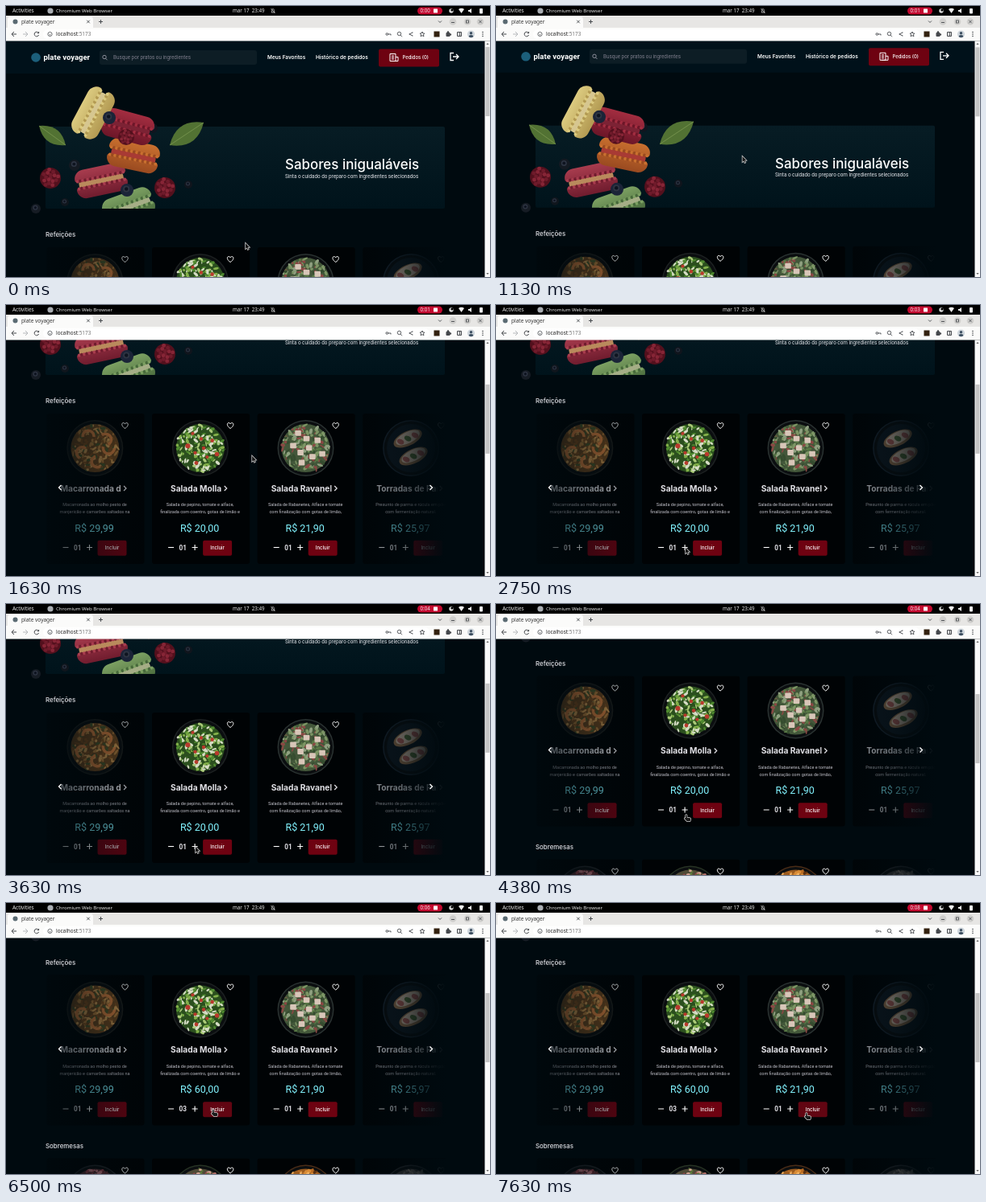
An HTML page with a canvas that plays this animation: 600 px wide and 337 px high, repeating every 8000 ms.

```html
<!DOCTYPE html>
<html lang="pt-BR">
<head>
<meta charset="utf-8">
<title>plate voyager</title>
<style>
  html, body { margin: 0; height: 100%; overflow: hidden; background: #000a0f; }
  canvas { display: block; width: 100vw; height: 100vh; }
</style>
</head>
<body>
<canvas id="stage" width="600" height="337"></canvas>
<script>
const ctx = document.getElementById('stage').getContext('2d');
const TAU = Math.PI * 2, LOOP = 8, STEP = 0.125;

// [seconds, x, y] of the pointer tip, and [seconds, offset] of the page scroll
const POINTER = [[0.125, 297, 295], [1, 305.5, 187], [1.9, 305, 188], [2.75, 235, 302], [3.9, 235, 302],
  [4.375, 235, 262], [5.5, 235, 262], [6.25, 254, 257], [6.45, 254, 257], [7.125, 383, 260],
  [7.3, 383, 260], [7.625, 384, 261]];
const SCROLL = [[1.1, 0], [1.6, 165], [3.9, 165], [4.3, 210.5]];

const DISHES = [
  { title: 'Macarronada de camarão', price: '29,99', plate: 'pasta',
    lines: ['Macarronada ao molho pesto de', 'manjericão e camarões saltados na'] },
  { title: 'Salada Molla', plate: 'salad',
    lines: ['Salada de pepino, tomate e alface,', 'finalizada com coentro, gotas de limão e'] },
  { title: 'Salada Ravanello', price: '21,90', plate: 'radish',
    lines: ['Salada de Rabanetes, Alface e tomate', 'com finalização com gotas de limão,'] },
  { title: 'Torradas de Parma', price: '25,97', plate: 'toast',
    lines: ['Presunto de parma e rúcula em pão', 'com fermentação natural.'] },
];
const DESSERTS = ['berries', 'peach', 'tart', 'cocoa'].map(plate => ({ plate }));

const PLATES = {
  pasta: { rim: '#1c1e1c', base: '#65431f', bits: ['#a8763a', '#794c20', '#c59350', '#46532a'], shrimp: '#c8773c' },
  salad: { rim: '#1d2122', base: '#2b4f1e', bits: ['#4f8a2f', '#83b04a', '#2a4f1c', '#a9c876', '#d5dcc4'],
    extra: ['#b83a2c', 9, 3.4] },
  radish: { rim: '#2a3231', base: '#43573a', bits: ['#587845', '#7c9564', '#354c2f', '#8a4844', '#8fa080'],
    extra: ['#d8c6b8', 9, 3.8, true] },
  toast: { rim: '#1b2733', base: '#101a23', bits: [], toast: true },
  berries: { rim: '#22262a', base: '#4b2b30', bits: ['#8c3d48', '#b8737a', '#5a2a30'] },
  peach: { rim: '#273324', base: '#4f4a36', bits: ['#b46f68', '#8e3e44', '#5b7a3a', '#d0a090'] },
  tart: { rim: '#4a2c16', base: '#9a5a1e', bits: ['#d88a34', '#b86a22', '#5a3010', '#eeb060'] },
  cocoa: { rim: '#2a2c30', base: '#3c3a3a', bits: ['#6a6462', '#4c4644', '#8a8078'] },
};

const ICONS = {
  heart: 'M0 3.5C-5 .3-4.2-3.4-2.2-3.4C-1-3.4 0-2.6 0-2C0-2.6 1-3.4 2.2-3.4C4.2-3.4 5 .3 0 3.5Z',
  left: 'M1.5-3L-1.5 0L1.5 3', right: 'M-1.5-3L1.5 0L-1.5 3', down: 'M-2-1L0 1L2-1',
  minus: 'M-3.5 0H3.5', plus: 'M-3.5 0H3.5M0-3.5V3.5', cross: 'M-1.8-1.8L1.8 1.8M-1.8 1.8L1.8-1.8',
  search: 'M1.7-.5A2.2 2.2 0 1 1-2.7-.5A2.2 2.2 0 1 1 1.7-.5M1 1.2L3 3.2',
  receipt: 'M-5-4.5H2V4.5H-5ZM2-.5H5V4.5H-3M-3-2H0M-3 0H0M-3 2H0',
  exit: 'M-1-4.5H-5V4.5H-1M-2 0H5M2-3L5 0L2 3',
  back: 'M3 0H-3M0-3L-3 0L0 3', forward: 'M-3 0H3M0-3L3 0L0 3',
  reload: 'M2.4-1.4A2.8 2.8 0 1 0 2.6 1M2.6-3V-1.2H.8',
  info: 'M2.6 0A2.6 2.6 0 1 1-2.6 0A2.6 2.6 0 1 1 2.6 0M0-.3V1.5',
  key: 'M-.4 0A1.3 1.3 0 1 1-3 0A1.3 1.3 0 1 1-.4 0H3V1.5',
  share: 'M2-2L-2 0L2 2M1.5-2H2.5M-2.5 0H-1.5M1.5 2H2.5',
  star: 'M0-3L.9-1L3-.8L1.4.6L2 2.8L0 1.7L-2 2.8L-1.4.6L-3-.8L-.9-1Z',
  bell: 'M-2 2H2L1.4 1V-.5C1.4-3-1.4-3-1.4-.5V1ZM-2.5-3L2.5 3',
  panel: 'M-2.5-2.5H2.5V2.5H-2.5ZM.6-2.5V2.5',
  arrow: 'M0 0V7L1.7 5.5L2.8 8L3.8 7.5L2.8 5.1L4.8 4.9Z',
  hand: 'M0 1C0-.3 1.6-.3 1.6 1V3.4L5.6 4.2C6.6 4.6 6.4 6 5.6 8H1.6L-1.2 5C-1.6 4.2-.8 3.7 0 4.4Z',
};

function text(str, x, y, size, { color = '#fff', weight = 400, face = 'Inter', align = 'left' } = {}) {
  ctx.font = `${weight} ${size}px ${face}, sans-serif`;
  ctx.fillStyle = color;
  ctx.textAlign = align;
  ctx.fillText(str, x, y);
}

function box(x, y, w, h, color, radius = 0) {
  ctx.fillStyle = color;
  ctx.beginPath();
  ctx.roundRect(x, y, w, h, radius);
  ctx.fill();
}

function oval(x, y, rx, ry, color, angle = 0) {
  ctx.fillStyle = color;
  ctx.beginPath();
  ctx.ellipse(x, y, rx, ry, angle, 0, TAU);
  ctx.fill();
}
const dot = (x, y, r, color) => oval(x, y, r, r, color);

function icon(name, x, y, color = '#fff', width = 1, fill) {
  const path = new Path2D(ICONS[name]);
  ctx.save();
  ctx.translate(x, y);
  ctx.strokeStyle = color;
  ctx.lineWidth = width;
  ctx.stroke(path);
  if (fill) { ctx.fillStyle = fill; ctx.fill(path); }
  ctx.restore();
}

function gradient(x0, y0, x1, y1, ...colors) {
  const g = ctx.createLinearGradient(x0, y0, x1, y1);
  colors.forEach((c, i) => g.addColorStop(i / (colors.length - 1), c));
  return g;
}

function clipped(x, y, w, h, draw) {
  ctx.save();
  ctx.beginPath();
  ctx.rect(x, y, w, h);
  ctx.clip();
  draw();
  ctx.restore();
}

function random(seed) {
  return () => (seed = (seed * 16807) % 2147483647) / 2147483647;
}

function track(keys, t) {
  const next = keys.findIndex(k => k[0] > t);
  if (next < 0) return keys.at(-1).slice(1);
  if (next === 0) return keys[0].slice(1);
  const a = keys[next - 1], b = keys[next];
  const u = (t - a[0]) / (b[0] - a[0]), e = u * u * (3 - 2 * u);
  return a.slice(1).map((v, i) => v + (b[i + 1] - v) * e);
}

function macaron(x, y, degrees, light, dark, cream) {
  ctx.save();
  ctx.translate(x, y);
  ctx.rotate(degrees * Math.PI / 180);
  box(-28, -4, 56, 9, cream, 3);
  for (const side of [-1, 1]) {
    // a domed shell with a ruffled foot facing the filling
    box(-32, side < 0 ? -18 : 4, 64, 14, gradient(0, -18, 0, 18, light, dark),
      side < 0 ? [24, 24, 5, 5] : [5, 5, 24, 24]);
    for (let i = -9; i <= 9; i++) dot(i * 3.2, side * 4.6, 2, i % 2 ? light : dark);
  }
  ctx.restore();
}

function raspberry(x, y, r) {
  dot(x, y, r, '#53101d');
  for (let i = 0; i < 16; i++) {
    const d = r * 0.21 * Math.sqrt(i);
    dot(x + d * Math.cos(i * 2.4), y + d * Math.sin(i * 2.4), r * 0.19, i % 2 ? '#862536' : '#6f1b2b');
  }
}

function blueberry(x, y, r, color = '#1b2438') {
  dot(x, y, r, color);
  dot(x - r * 0.1, y - r * 0.2, r * 0.5, '#2e3543');
  dot(x - r * 0.1, y - r * 0.2, r * 0.28, '#0e1420');
}

function leaf(x0, y0, x1, y1, w) {
  const mx = (x0 + x1) / 2, my = (y0 + y1) / 2, len = Math.hypot(x1 - x0, y1 - y0);
  const nx = (y1 - y0) / len * w, ny = (x0 - x1) / len * w;
  ctx.beginPath();
  ctx.moveTo(x0, y0);
  ctx.quadraticCurveTo(mx + nx, my + ny, x1, y1);
  ctx.quadraticCurveTo(mx - nx, my - ny, x0, y0);
  ctx.fillStyle = '#527233';
  ctx.fill();
  ctx.beginPath();
  ctx.moveTo(x0, y0);
  ctx.lineTo(x1, y1);
  ctx.strokeStyle = '#7c9852';
  ctx.lineWidth = 0.8;
  ctx.stroke();
}

function banner() {
  box(49, 150, 495, 102, gradient(0, 150, 0, 252, '#071c24', '#00131b'), 2);
  leaf(203, 173, 245, 145, 23);
  leaf(41, 149, 74, 173, 18);
  blueberry(182, 152, 6, '#10151f');
  clipped(0, 90, 300, 162, () => {
    macaron(152, 250, -20, '#7ca062', '#46683a', '#a5ad86');
    macaron(118, 217, -12, '#a83c4e', '#701c2e', '#b98a5c');
    macaron(158, 186, 12, '#c9702f', '#9a4a20', '#a83a34');
    macaron(151, 150, 15, '#a32d40', '#6c1628', '#7c2234');
    macaron(108, 133, -62, '#dccb80', '#b39a52', '#d6c690');
  });
  raspberry(149, 163, 10);
  raspberry(55, 214, 13);
  raspberry(197, 226, 13);
  blueberry(128, 139, 8);
  blueberry(150, 229, 8);
  blueberry(85, 198, 7, '#141a22');
  blueberry(226, 222, 5, '#10151d');
  blueberry(37, 252, 6, '#161c24');
  blueberry(73, 244, 5, '#10161d');
  text('Sabores inigualáveis', 346, 203, 16.9, { weight: 500 });
  text('Sinta o cuidado do preparo com ingredientes selecionados', 346, 213.5, 6.35, { face: 'Roboto', color: '#e1e1e6' });
}

function header() {
  box(0, 43, 593, 41, '#00111a');
  dot(37, 64, 5.8, '#1c5f7b');
  text('plate voyager', 46.5, 67, 9.5, { face: 'Roboto', weight: 700 });
  box(116, 55, 195, 18, '#0d1d25', 3);
  icon('search', 122.5, 64, '#9a9aa6', 0.9);
  text('Busque por pratos ou ingredientes', 133, 66.3, 6.3, { face: 'Roboto', color: '#7c7c8a' });
  text('Meus Favoritos', 324, 66, 6.4, { weight: 600 });
  text('Histórico de pedidos', 384, 66, 6.5, { weight: 600 });
  box(462, 53.5, 75, 22, '#6e0211', 2);
  icon('receipt', 481, 64, '#fff', 1);
  text('Pedidos (0)', 491.5, 66.2, 5.9, { weight: 500 });
  icon('exit', 556, 63, '#fff', 1.3);
}

function plate(x, y, kind, seed) {
  const { rim, base, bits, extra, shrimp, toast } = PLATES[kind], rnd = random(seed);
  dot(x, y, 35, rim);
  dot(x, y, 33.5, '#0b0e10');
  dot(x, y, 30, base);
  for (let i = 0; bits.length && i < 190; i++) {
    const a = rnd() * TAU, d = Math.sqrt(rnd()) * 29;
    oval(x + d * Math.cos(a), y + d * Math.sin(a), 1.5 + rnd() * 2.5, 0.8 + rnd() * 1.2,
      bits[Math.floor(rnd() * bits.length)], rnd() * TAU);
  }
  if (extra) {
    const [color, count, r, square] = extra;
    for (let i = 0; i < count; i++) {
      const d = 7.6 * Math.sqrt(i + 0.3), px = x + d * Math.cos(i * 2.4), py = y + d * Math.sin(i * 2.4);
      if (square) box(px - r, py - r, r * 2, r * 1.8, color, 1);
      else dot(px, py, r * (0.6 + rnd() * 0.4), color);
    }
  }
  for (let i = 0; shrimp && i < 5; i++) {
    ctx.beginPath();
    ctx.arc(x + 17 * Math.cos(i * 1.4), y + 17 * Math.sin(i * 1.4), 7, i, i + 3.4);
    ctx.strokeStyle = shrimp;
    ctx.lineWidth = 3.5;
    ctx.stroke();
  }
  if (toast) for (const [dx, dy] of [[-4, -12], [3, 10]]) {
    oval(x + dx, y + dy, 19, 9, '#9a7450', -0.45);
    oval(x + dx, y + dy - 1, 16, 7, '#d9c3ae', -0.45);
    for (let i = -1; i < 2; i++) oval(x + dx + i * 9, y + dy - i * 4, 4.5, 3, i ? '#b0605a' : '#56703c', 0.5);
  }
}

function card(dish, i, top, qty, pointer) {
  const cx = 109.5 + 130.6 * i;
  box(cx - 59, top, 121, 187, '#000305', 3);
  plate(cx + 0.8, top + 43, dish.plate, 77 + i * 31 + top);
  icon('heart', cx + 38, top + 15, '#fff', 1);
  if (!dish.title) return;

  ctx.font = '700 10.2px Inter, sans-serif';
  const w = Math.min(ctx.measureText(dish.title).width, 75), left = cx - (w + 9) / 2;
  clipped(left, top + 85, w, 18, () => text(dish.title, left, top + 96.5, 10.2, { weight: 700, color: '#e1e1e6' }));
  icon('right', left + w + 5, top + 93, '#e1e1e6', 1.2);

  const mid = { face: 'Roboto', align: 'center' };
  dish.lines.forEach((line, n) => text(line, cx + 0.5, top + 115 + n * 9.3, 5.5, { ...mid, color: '#c4c4cc' }));
  text('R$ ' + (dish.price || `${20 * qty},00`), cx, top + 146.5, 12.5, { ...mid, color: '#82f3ff' });

  const row = top + 167;
  icon('minus', cx - 35.5, row - 0.5, '#fff', 1.1);
  text('0' + qty, cx - 20.8, row + 2.8, 8.2, { ...mid, weight: 700, color: '#e1e1e6' });
  icon('plus', cx - 6, row - 0.5, '#fff', 1.1);
  const hover = Math.abs(pointer.x - cx - 22) < 18 && Math.abs(pointer.y - row) < 10;
  box(cx + 4, row - 9.3, 36, 19, hover ? '#620512' : '#6e0211', 2);
  text('Incluir', cx + 22, row + 2.2, 6, { weight: 500, align: 'center' });
}

function carousel(name, dishes, top, qty, pointer) {
  text(name, 49, top - 13, 7.9, { weight: 500, color: '#e1e1e6' });
  clipped(49, top, 496, 190, () => {
    dishes.forEach((dish, i) => card(dish, i, top, i === 1 ? qty : 1, pointer));
    box(49, top, 123, 190, gradient(49, 0, 172, 0, 'rgba(0,10,15,.75)', 'rgba(0,10,15,.2)'));
    box(441, top, 104, 190, gradient(441, 0, 545, 0, 'rgba(0,10,15,.3)', 'rgba(0,10,15,.58)', '#000a0f'));
  });
  icon('left', 67, top + 92, '#fff', 1.3);
  icon('right', 527, top + 92, '#fff', 1.3);
}

function browser(t, scroll) {
  const bar = { face: 'Noto Sans', color: '#e8e8e8' }, ink = '#45484c';
  box(0, 0, 600, 12, '#000');
  text('Activities', 8, 8.3, 6.4, bar);
  dot(55, 6, 3.6, '#a9adb2');
  text('Chromium Web Browser', 62, 8.3, 6.1, bar);
  text('mar 17  23:49', 281, 8.3, 6.2, bar);
  icon('bell', 331, 6, '#ddd', 0.7);
  box(510, 1.5, 31, 9, '#c4082f', 4.5);
  text(`0:0${Math.floor(t * 1.0015 + 0.37)}`, 513.5, 8.2, 6.2, bar);
  box(530, 3.6, 5, 5, '#fff', 0.5);
  dot(552, 6, 2.7, '#ddd');
  dot(553, 5, 1.6, '#000');
  for (const path of ['M561 4Q564.5 1.5 568 4L564.5 9Z', 'M573 5H574.5L577 3V9L574.5 7H573Z']) {
    ctx.fillStyle = '#eee';
    ctx.fill(new Path2D(path));
  }
  box(587, 3, 4, 6.5, '#eee', 1);

  box(0, 12, 600, 15, '#e7e6e4');
  box(2, 13, 106, 15, '#fbfbfa', [4, 4, 0, 0]);
  dot(11.5, 19.5, 3, '#5a6a72');
  text('plate voyager', 19, 21.7, 6.5, { face: 'Noto Sans', color: '#333' });
  icon('cross', 102, 19.5, ink, 0.9);
  ctx.save();
  ctx.translate(117.5, 19.5);
  ctx.scale(0.7, 0.7);
  icon('plus', 0, 0, ink, 1.4);
  ctx.restore();
  icon('down', 538, 19.5, ink, 0.9);
  for (const x of [554, 572, 588]) dot(x, 19.5, 4.3, '#d0cfcd');
  box(552, 20, 4, 0.9, ink);
  ctx.strokeStyle = ink;
  ctx.lineWidth = 0.8;
  ctx.strokeRect(570.5, 18, 3, 3);
  icon('cross', 588, 19.5, ink, 0.8);

  box(0, 27, 600, 16.5, '#fbfbfa');
  box(46, 29, 479, 12.5, '#fff', 6);
  icon('back', 10, 35, ink, 1);
  icon('forward', 24, 35, '#b4b7ba', 1);
  icon('reload', 38, 35, ink, 1);
  icon('info', 54.5, 35, ink, 0.8);
  text('localhost', 62, 37.3, 6.4, { face: 'Noto Sans', color: '#222' });
  const port = 62 + ctx.measureText('localhost').width;
  text(':5173', port, 37.3, 6.4, { face: 'Noto Sans', color: '#777' });
  ['key', 'search', 'share', 'star'].forEach((name, i) => icon(name, 474 + i * 14, 35, ink, 0.9));
  box(530.5, 31.5, 7, 7, '#33210f');
  box(545.5, 33, 5, 5, ink, 1);
  dot(548, 32.6, 1.3, ink);
  dot(550.8, 35.5, 1.3, ink);
  icon('panel', 562, 35, ink, 1);
  dot(576.5, 35, 4.6, '#cfd6dc');
  dot(576.5, 33.8, 1.7, '#3d4f60');
  oval(576.5, 37.6, 2.8, 1.6, '#3d4f60');
  for (const y of [32.5, 35, 37.5]) dot(591, y, 0.8, ink);

  box(593.5, 43.5, 6.5, 293.5, '#fafafa');
  box(594.5, 51 + scroll * 0.29, 5, 86, '#c4c4c4');
  ctx.fillStyle = '#666';
  ctx.fill(new Path2D('M595.3 48L597 46L598.7 48ZM595.3 332L597 334L598.7 332Z'));
}

function render(t) {
  const [scroll] = track(SCROLL, t), [px, py] = track(POINTER, t);
  const qty = t < 4.75 ? 1 : t < 5 ? 2 : 3;
  box(0, 0, 600, 337, '#000a0f');
  ctx.save();
  ctx.translate(0, -scroll);
  header();
  banner();
  const pointer = { x: px, y: py + scroll };
  carousel('Refeições', DISHES, 300, qty, pointer);
  carousel('Sobremesas', DESSERTS, 528, 1, pointer);
  ctx.restore();
  browser(t, scroll);
  icon(t < 4.25 ? 'arrow' : 'hand', px, py, '#d8d8d8', 1.4, '#1a1a1a');
}

function tick(now) {
  render(Math.floor((now / 1000 % LOOP) / STEP) * STEP);
  requestAnimationFrame(tick);
}
tick(performance.now());
</script>
</body>
</html>
```
